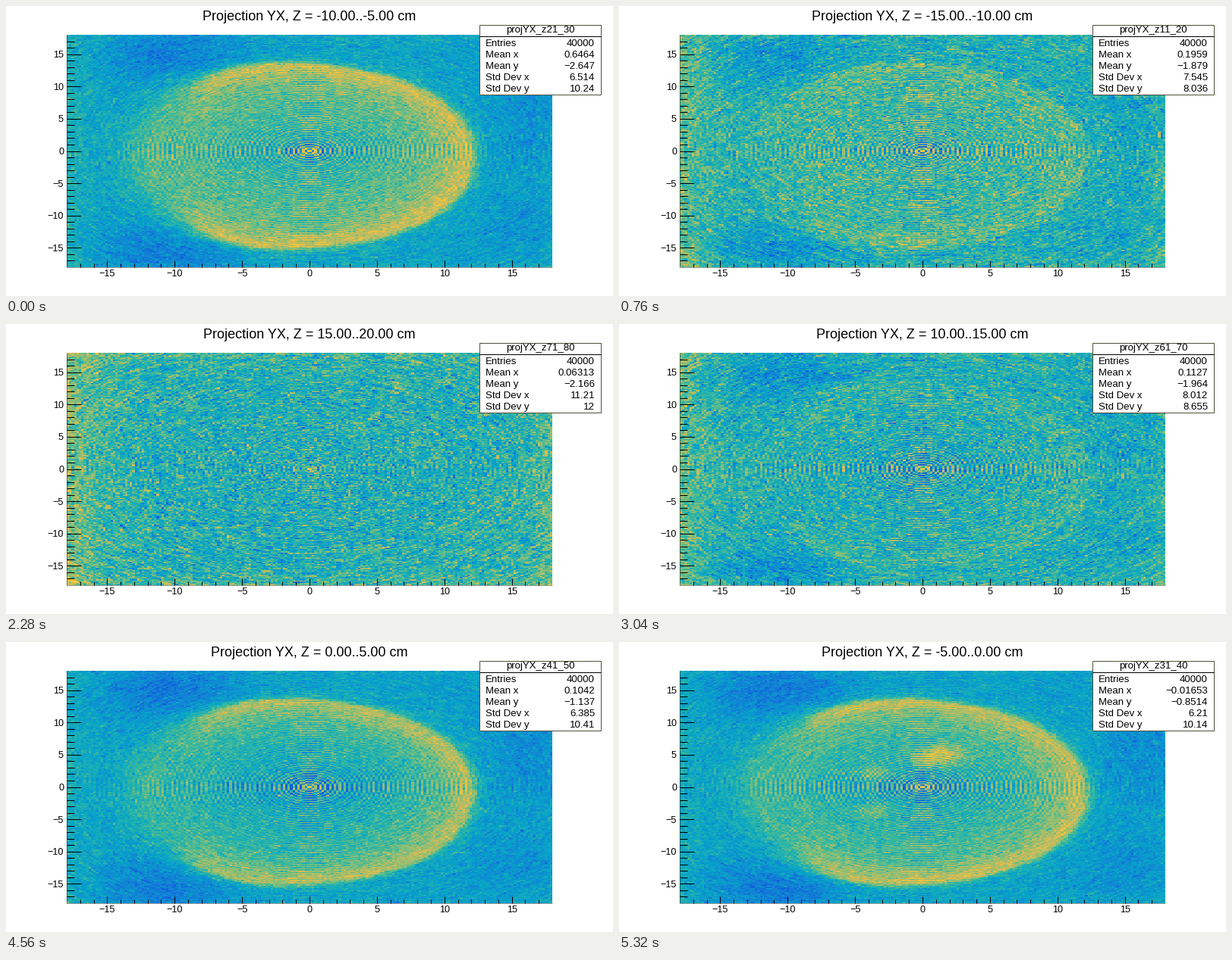
A matplotlib script for the animation above (6.08 s loop, 800x383 px).

```python
import numpy as np
import matplotlib.pyplot as plt
from matplotlib.animation import FuncAnimation
from matplotlib.colors import LinearSegmentedColormap
from matplotlib.patches import Rectangle

W, H = 800, 383
LEFT, RIGHT, TOP, BOTTOM = 80, 720, 0.1 * H, 0.9 * H
BINS, LIMIT = 200, 18.0
SLICES = 8
PT = 0.72  # points per pixel at 100 dpi

plt.rcParams["font.family"] = "Liberation Sans"

# from one eighth to seven eighths of the blue-to-yellow scale
BIRD = LinearSegmentedColormap.from_list(
    "bird", "#0f5cdd #1480d6 #06a4ca #2eb7a4 #87bf77 #d1bb59 #fec832".split())

# mean x, mean y, std dev x, std dev y
STATS = """
0.6464 -2.647 6.514 10.24
0.1959 -1.879 7.545 8.036
-2.82 -1.701 12.82 12.88
0.06313 -2.166 11.21 12
0.1127 -1.964 8.012 8.655
0.2218 -1.522 6.628 10.84
0.1042 -1.137 6.385 10.41
-0.01653 -0.8514 6.21 10.14
""".strip().splitlines()

steps = np.arange(BINS) + 0.5 - BINS / 2
COL, ROW = np.meshgrid(steps, -steps)
X, Y = COL * 2 * LIMIT / BINS, ROW * 2 * LIMIT / BINS
R = np.hypot(COL, ROW)
RING = R.astype(int)
SECTOR = ((np.arctan2(ROW, COL) + np.pi) * 20).astype(int)


def spot(cx, cy, sx, sy):
    return np.exp(-((X - cx) / sx) ** 2 - ((Y - cy) / sy) ** 2)


def step(v, width):
    return 1 / (1 + np.exp(-np.clip(v / width, -50, 50)))


# Egg-shaped outline: two half ellipses with a common crown, blurred at left
POWER = 2.12
S = (np.abs((X + 2) / np.where(X > -2, 14.2, 10.2)) ** POWER
     + np.abs((Y + 0.8) / 14.4) ** POWER) ** (1 / POWER)
BLUNT = step(-8.8 - X, 0.7)
BODY = step(1 - S, 0.016 + 0.07 * BLUNT)
RIM = np.exp(-np.clip(1 - S, 0, 1) / 0.18) * (1 - 0.75 * BLUNT)
HALO = np.exp(-np.clip(S - 1, 0, 2) / 0.12)
FAN = spot(-11, 0, 2.8, 5)
LOBES = (spot(-10.5, 15, 5, 4.5) + spot(-10.5, -15.5, 5, 4.5)
         + 0.6 * spot(17, 5, 3.5, 9) + 0.4 * spot(16, -12, 4, 5))
EDGE = (np.exp((X - LIMIT) / 1.8) * 0.6 + np.exp(-(X + LIMIT) / 2.2)
        + 0.3 * np.exp((np.abs(Y) - LIMIT) / 1.5))
HOT = (spot(1.2, 4.8, 1.8, 1.5) + 0.6 * spot(-3.6, 2.2, 1.2, 1)
       + 0.5 * spot(-3.5, -3.7, 1.2, 1))

# Alternating rings, sampled bin by bin, strongest along both axes
CROSS = np.maximum(np.exp(-(Y / 2.2) ** 2), 0.8 * np.exp(-(X / 2) ** 2))
WAVE = np.sin(np.pi * R)
RIPPLE = ((WAVE + np.sign(WAVE)) * 0.2 / np.sqrt(1 + R / 4)
          * (0.35 + 0.65 * CROSS))


def z_start(k):
    return (10 - 5 * k) % 40 - 20


def density(k):
    rng = np.random.default_rng(40 + k)
    mid = z_start(k) + 2.5
    signal = step(10.8 - abs(mid), 1.4)  # fades towards both ends
    faint = 1 - signal

    rings = RIPPLE * rng.uniform(0.6, 1.3, BINS)[RING]
    arcs = rng.normal(size=(BINS, BINS))[RING, SECTOR]
    grain = 0.7 * rng.normal(size=R.shape) + 0.6 * arcs

    body = 0.45 + 0.08 * np.exp(-((mid + 9) / 7) ** 2)
    body = body + signal * (0.33 * RIM - 0.08 * spot(0, 0, 6, 4))
    body += 0.3 * np.exp(-((mid + 2.5) / 3.5) ** 2) * HOT
    around = 0.46 - 0.1 * signal + signal * (0.06 * HALO + 0.12 * FAN)
    around = around + (0.07 + 0.13 * faint) * EDGE
    around -= 0.14 * step(14.5 - abs(mid), 1) * LOBES

    field = BODY * body + (1 - BODY) * around
    field += rings * (0.4 + 0.6 * BODY * step(15 - abs(mid), 1))
    field += (0.055 + 0.06 * faint) * grain
    field += 0.35 * np.exp(-(R / 2.2) ** 2)
    return np.clip(field, 0.125, 0.85)


fig = plt.figure(figsize=(W / 100, H / 100), dpi=100, facecolor="white")
ax = fig.add_axes([0, 0, 1, 1])


def line(x0, y0, x1, y1, **style):
    ax.plot([x0, x1], [y0, y1], color="black", lw=PT,
            solid_capstyle="butt", **{"zorder": 3, **style})


def label(x, y, s, size, ha):
    return ax.text(x, y, s, size=size * PT, ha=ha, va="baseline", zorder=6)


def minus(s):
    return str(s).replace("-", "\u2212")


picture = ax.imshow(np.zeros((BINS, BINS)), cmap=BIRD, vmin=1 / 8, vmax=7 / 8,
                    extent=(LEFT, RIGHT, BOTTOM, TOP), aspect="auto",
                    interpolation="nearest", zorder=1)
ax.set_xlim(0, W)
ax.set_ylim(H, 0)
ax.axis("off")

line(LEFT, BOTTOM, RIGHT, BOTTOM, alpha=0.4)
line(LEFT, TOP, LEFT, BOTTOM, alpha=0.4)
for v in range(-17, 18):
    px = (LEFT + RIGHT) / 2 + v * (RIGHT - LEFT) / (2 * LIMIT)
    py = (TOP + BOTTOM) / 2 - v * (BOTTOM - TOP) / (2 * LIMIT)
    major = v % 5 == 0
    line(px, BOTTOM, px, BOTTOM - (9.2 if major else 4.6))
    line(LEFT, py, LEFT + (19.2 if major else 9.6), py)
    if major:
        label(px, 357, minus(v), 12.6, "center")
        label(76, py + 4.5, minus(v), 12.6, "right")

ax.add_patch(Rectangle((623.5, 24.5), 160, 92, fc="white", ec="#50503c",
                       lw=PT, zorder=4))
line(623.5, 39.5, 783.5, 39.5, zorder=5)
values = []
for i, name in enumerate("Entries,Mean x,Mean y,Std Dev x,Std Dev y".split(",")):
    y = 53 + 15.1 * i
    label(632, y, name, 13.3, "left")
    values.append(label(776, y, "40000", 13.3, "right"))
title = label(400, 19, "", 18.05, "center")
header = label(704, 35.3, "", 13.3, "center")

FIELDS = [density(k) for k in range(SLICES)]


def update(k):
    z = z_start(k)
    first = (z + 20) * 2 + 1
    picture.set_data(FIELDS[k])
    title.set_text(f"Projection YX, Z = {z:.2f}..{z + 5:.2f} cm")
    header.set_text(f"projYX_z{first}_{first + 9}")
    for text, value in zip(values[1:], STATS[k].split()):
        text.set_text(minus(value))
    return [picture, title, header, *values]


anim = FuncAnimation(fig, update, frames=SLICES, interval=760,
                     repeat=True, repeat_delay=0, blit=False)
plt.show()
```
